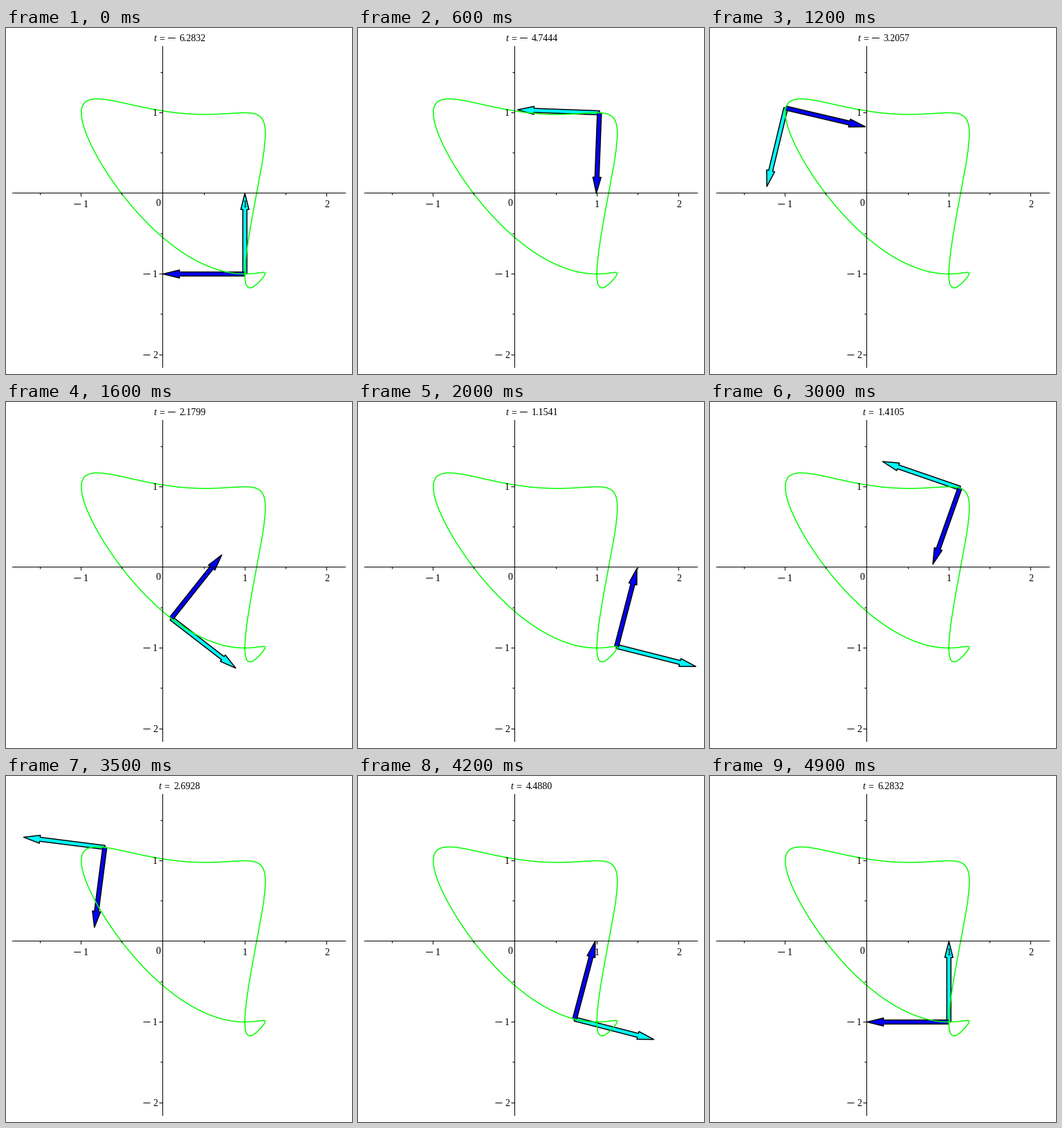
A matplotlib script that plays this animation: 500 by 500 pixels, repeating every 5 s.

```python
import numpy as np
import matplotlib.pyplot as plt
from matplotlib.animation import FuncAnimation
from matplotlib.patches import Polygon

SIZE = 500
FRAMES = 50
ORIGIN = np.array([227.0, 239.0])
SCALE = np.array([118.2, -116.5])
AXIS_X, AXIS_Y = 226.5, 238.5

plt.rcParams["font.family"] = "Liberation Serif"
fig = plt.figure(figsize=(SIZE / 72, SIZE / 72), dpi=72, facecolor="white")
ax = fig.add_axes([0, 0, 1, 1])
ax.set(xlim=(0, SIZE), ylim=(SIZE, 0))
ax.axis("off")


def to_px(points):
    return ORIGIN + SCALE * np.asarray(points)


def position(t):
    c, s = np.cos(t), np.sin(t)
    return np.array([c + s**2, s - c**3])


def tangent(t):
    c, s = np.cos(t), np.sin(t)
    v = np.array([2 * s * c - s, c + 3 * c**2 * s])
    return v / np.hypot(*v)


def left_of(v):
    return np.array([-v[1], v[0]])


def arrow_outline(base, direction):
    """Unit-length arrow, shaft 0.05 wide, head 0.1 wide and 0.2 long."""
    along = np.array([0, 0.8, 0.8, 1, 0.8, 0.8, 0])
    across = np.array([1, 1, 2, 0, -2, -1, -1]) * 0.025
    side = left_of(direction)
    return to_px(base + np.outer(along, direction) + np.outer(across, side))


def segment(x0, y0, x1, y1):
    return ax.plot([x0, x1], [y0, y1], color="black", lw=1, zorder=3,
                   snap=False, solid_capstyle="butt")[0]


def label(x, baseline, text, ha="center", **style):
    return ax.text(x, baseline, text, size=14, ha=ha, va="baseline",
                   zorder=4, **style)


def tick_label(x, baseline, value):
    label(x, baseline, str(abs(value)))
    if value < 0:
        segment(x - 17, baseline - 4.5, x - 7, baseline - 4.5)


def draw_axes():
    segment(9, AXIS_Y, 491, AXIS_Y)
    segment(AXIS_X, 26, AXIS_X, 491)
    for half in range(-4, 5):
        if half == 0:
            continue
        x, y = np.floor(to_px([half / 2, half / 2])) + 0.5
        length = 3 if half % 2 else 5
        if half > -4:
            segment(x, AXIS_Y, x, AXIS_Y + length)
        if half < 4:
            segment(AXIS_X - length, y, AXIS_X, y)
    for value in (-1, 1, 2):
        x = to_px([value, 0])[0]
        tick_label(x + (6.5 if value < 0 else 0), 259, value)
    for value in (-2, -1, 1):
        tick_label(215.5, np.floor(to_px([0, value])[1]) + 5, value)
    label(219.5, 257, "0")


draw_axes()
ax.plot(*to_px(position(np.linspace(0, 2 * np.pi, 400)).T).T,
        color="#00ff00", lw=1.5, zorder=2)

arrow_style = dict(closed=True, ec="black", lw=1.5, joinstyle="round")
tangent_arrow = ax.add_patch(Polygon(np.zeros((7, 2)), fc="cyan", zorder=1, **arrow_style))
normal_arrow = ax.add_patch(Polygon(np.zeros((7, 2)), fc="blue", zorder=1.1, **arrow_style))

name_text = label(0, 19, "t", ha="left", style="italic")
equals_text = label(0, 19, "=")
number_text = label(0, 19, "", ha="left")
title_minus = segment(234, 14.5, 245, 14.5)


def update(frame):
    t = -2 * np.pi + 4 * np.pi * frame / (FRAMES - 1)
    base, direction = position(t), tangent(t)
    tangent_arrow.set_xy(arrow_outline(base, direction))
    normal_arrow.set_xy(arrow_outline(base, left_of(direction)))

    negative = t < 0
    left = 213 if negative else 220
    name_text.set_x(left)
    equals_text.set_x(left + 12)
    number_text.set_x(left + (37.5 if negative else 22.5))
    number_text.set_text(f"{abs(t):.4f}")
    title_minus.set_visible(negative)
    return (tangent_arrow, normal_arrow, name_text, equals_text,
            number_text, title_minus)


anim = FuncAnimation(fig, update, frames=FRAMES, interval=100,
                     repeat=True, repeat_delay=0)
plt.show()
```
